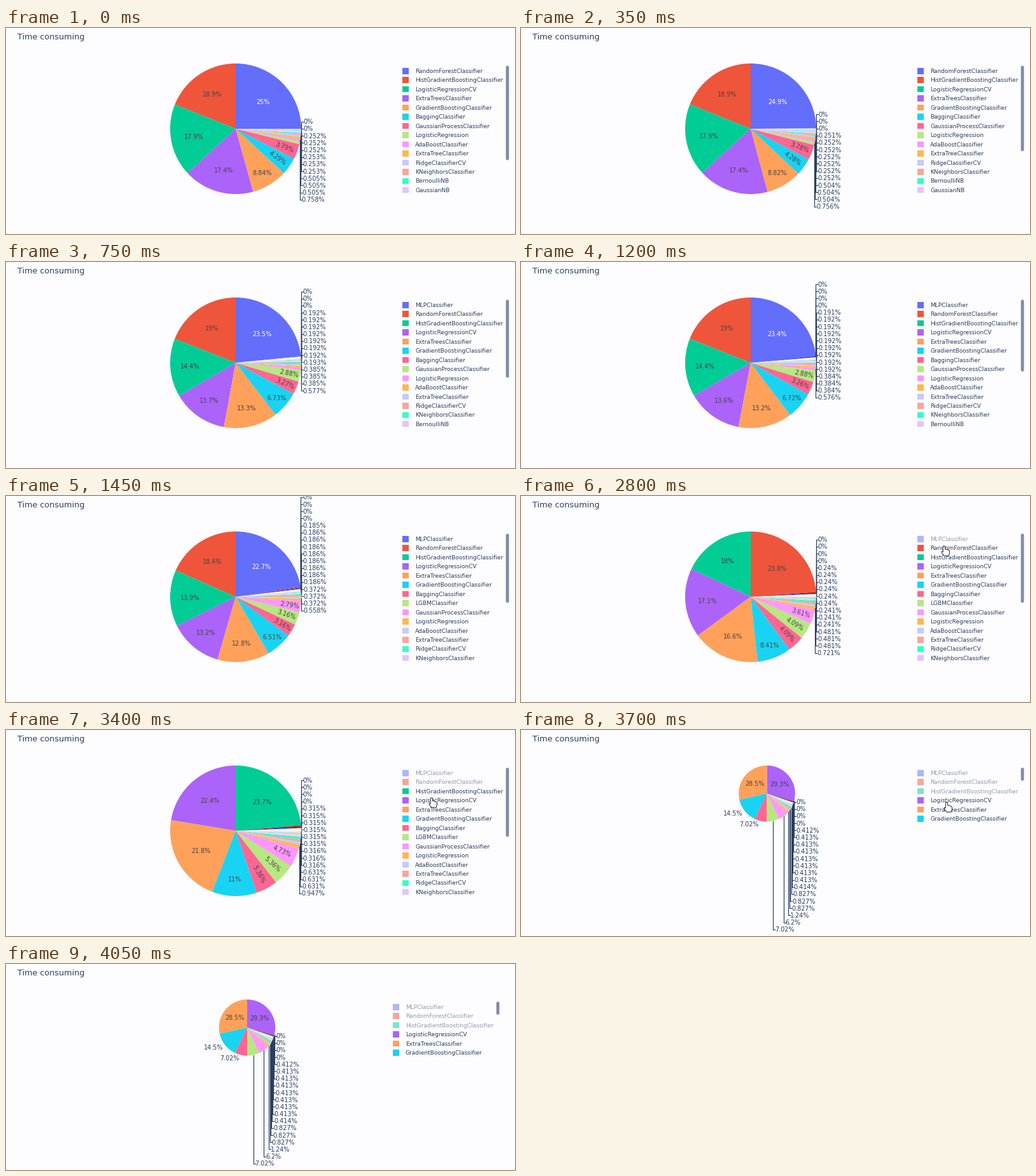
Write a matplotlib script that moves like this. It is 800x325 px and loops after 4.35 s.

```python
import colorsys
import math

import matplotlib.pyplot as plt
import numpy as np
from matplotlib.animation import FuncAnimation
from matplotlib.colors import to_rgb
from matplotlib.patches import FancyBboxPatch, Polygon, Rectangle, Wedge

W, H, DPI = 800, 325, 100
STEP, LOOP = 50, 4350
INK, DARK, PAPER = "#2a3f5f", "#444444", "#fdfcff"
LABEL_PX, LEGEND_PX, TITLE_PX = 9.7, 9.03, 12.8
PITCH, ROW = 11.18, 14.46

# name, seconds, stage at which the model finishes; sorted by time
MODELS = [
    ("MLPClassifier", 1.22, 4),
    ("RandomForestClassifier", 0.99, 0),
    ("HistGradientBoostingClassifier", 0.75, 0),
    ("LogisticRegressionCV", 0.71, 0),
    ("ExtraTreesClassifier", 0.69, 0),
    ("GradientBoostingClassifier", 0.35, 0),
    ("BaggingClassifier", 0.17, 0),
    ("LGBMClassifier", 0.17, 7),
    ("GaussianProcessClassifier", 0.15, 0),
    ("LogisticRegression", 0.03001, 0),
    ("AdaBoostClassifier", 0.02001, 0),
    ("ExtraTreeClassifier", 0.02001, 0),
    ("RidgeClassifierCV", 0.02001, 0),
    ("KNeighborsClassifier", 0.01001, 0),
    ("BernoulliNB", 0.010006, 0),
    ("GaussianNB", 0.010005, 0),
    ("LinearSVC", 0.00999, 0),
    ("NearestCentroid", 0.00999, 2),
    ("Perceptron", 0.00999, 3),
    ("SGDClassifier", 0.00999, 6),
    ("DecisionTreeClassifier", 0.00999, 0),
    ("CalibratedClassifierCV", 0.009975, 0),
    ("DummyClassifier", 0, 0),
    ("LinearDiscriminantAnalysis", 0, 0),
    ("PassiveAggressiveClassifier", 0, 1),
    ("RidgeClassifier", 0, 5),
]

# start in ms, stage, number of leading models hidden, layout
WIDE = dict(cx=361, cy=159, r=103, dx=0, rows=14)
SMALL = dict(cx=386.5, cy=100.3, r=44.3, dx=0, rows=6)
SMALL_SHIFTED = dict(SMALL, cx=379, dx=-15)
SCENES = [
    (0, 0, 0, WIDE), (150, 1, 0, WIDE), (350, 2, 0, WIDE), (600, 3, 0, WIDE),
    (750, 4, 0, WIDE), (1000, 5, 0, WIDE), (1200, 6, 0, WIDE),
    (1450, 7, 0, WIDE), (2700, 7, 1, WIDE), (3250, 7, 2, WIDE),
    (3650, 7, 3, SMALL), (4050, 7, 3, SMALL_SHIFTED),
]

# time, x, y of the pointer tip
POINTER = np.array([
    (2150, 608, 1), (2250, 627, 29), (2350, 651, 56), (2450, 660, 63),
    (2500, 661, 64), (2550, 661, 64), (2600, 662, 69), (2650, 662, 69),
    (2700, 664, 75), (2800, 665, 79), (2850, 665, 79), (3000, 667, 84),
    (3150, 668, 92), (3200, 668, 92), (3250, 668, 96), (3400, 669, 107),
    (3550, 669, 111), (3750, 669, 115), (3800, 669, 115), (3850, 618, 97),
])
POINTER_END = 3900
HAND = np.array([(-1.7, 1), (-0.8, 0), (0.6, 0), (1.6, 1), (1.6, 5), (4, 5),
                 (7.5, 6.5), (8.5, 8), (8.3, 11.5), (7, 15.5), (0, 15.5),
                 (-4, 10), (-3.7, 8.2), (-1.7, 9.3)])
ARROW = np.array([(0, 0), (0, 13), (3, 10.3), (5.3, 15.3), (7.2, 14.5),
                  (5, 9.7), (9.3, 9.5)])


def shade(color, delta):
    h, l, s = colorsys.rgb_to_hls(*to_rgb(color))
    return colorsys.hls_to_rgb(h, min(max(l + delta, 0), 1), s)


BASE = ["#636efa", "#ef553b", "#00cc96", "#ab63fa", "#ffa15a",
        "#19d3f3", "#ff6692", "#b6e880", "#ff97ff", "#ffb84f"]
COLORS = BASE + [shade(c, 0.2) for c in BASE] + [shade(c, -0.2) for c in BASE]

plt.rcParams["font.family"] = "DejaVu Sans"
fig = plt.figure(figsize=(W / DPI, H / DPI), dpi=DPI, facecolor=PAPER)
ax = fig.add_axes([0, 0, 1, 1])
ax.set(xlim=(0, W), ylim=(H, 0))
ax.axis("off")


def put_text(x, y, s, px, color=INK, ha="left", turn=0, alpha=1):
    """Text centred vertically on y; turn is clockwise in radians."""
    drop = 0.36 * px
    return ax.text(x - drop * math.sin(turn), y + drop * math.cos(turn), s,
                   fontsize=px * 72 / DPI, color=color, ha=ha, va="baseline",
                   rotation=-math.degrees(turn), rotation_mode="anchor",
                   alpha=alpha)


def percent(fraction):
    return f"{fraction * 100:.3g}%"


def text_width(s):
    return LABEL_PX * sum({".": 0.318, "%": 0.95}.get(c, 0.636) for c in s)


def inside_spot(fraction, s, r):
    """Radius share and whether to turn the label, or None if it must go out."""
    w, h = text_width(s), PITCH
    half = math.pi * min(fraction, 0.5)
    if half < 1e-6:
        return None
    inscribed = min(1 / (1 + 1 / math.sin(half)), 0.5)
    if 2 * inscribed * r >= math.hypot(w, h):
        return 1 - inscribed, False
    ratio = w / h
    q = ratio + 1 / (2 * math.tan(half))
    size = 1 / (math.sqrt(q * q + 0.5) + q)
    if 2 * size * (r - 6) >= h:
        return math.cos(size) - ratio * size, True
    return None


def stack(outside, natural):
    """Spread label heights away from three o'clock."""
    heights = {}
    upper = [k for k in outside if outside[k] <= 0.2501]
    lower = [k for k in outside if outside[k] > 0.2501]
    last = math.inf
    for k in reversed(upper):
        last = heights[k] = min(natural[k], last - PITCH)
    last = heights[upper[-1]] if upper else -math.inf
    for k in lower:
        last = heights[k] = max(natural[k], last + PITCH)
    return heights


def draw_pie(values, colors, cx, cy, r):
    parts = []
    shares = np.array(values) / sum(values)
    ends = 1 - np.concatenate([[0], np.cumsum(shares[1:])])
    outside, natural, edge = {}, {}, {}
    for i, share in enumerate(shares):
        start = 0 if i == 0 else ends[i - 1] - share
        mid = start + share / 2
        theta = 2 * math.pi * mid - math.pi / 2
        ux, uy = math.cos(theta), math.sin(theta)
        if share:
            parts.append(ax.add_patch(Wedge(
                (cx, cy), r, 360 * start - 90, 360 * (start + share) - 90,
                fc=colors[i], lw=0)))
        s = percent(share)
        spot = inside_spot(share, s, r)
        if spot:
            rho, turned = spot
            turn = theta + (math.pi if ux < 0 else 0) if turned else 0
            color = "white" if colors[i] == BASE[0] else DARK
            parts.append(put_text(cx + rho * r * ux, cy + rho * r * uy, s,
                                  LABEL_PX, color, "center", turn))
            continue
        x, y = cx + r * ux, cy + r * uy
        label_y = y + 5 * uy
        if ux < 0:
            parts.append(put_text(x - 3, label_y, s, LABEL_PX, ha="right"))
        else:
            outside[i], natural[i], edge[i] = mid, label_y, (x, y)
    clockwise = {i: outside[i] for i in reversed(outside)}
    for i, label_y in stack(clockwise, natural).items():
        x, y = edge[i]
        parts += ax.plot([x, x, x + 3], [y, label_y, label_y], color=INK,
                         lw=0.85, solid_joinstyle="miter")
        parts.append(put_text(x + 3, label_y, percent(shares[i]), LABEL_PX))
    return parts


def draw_legend(names, hidden, dx, rows):
    parts = []
    for i, name in enumerate(names[:rows]):
        y = 67.7 + ROW * i
        alpha = 0.5 if i < hidden else 1
        parts.append(ax.add_patch(Rectangle((623 + dx, y - 4.7), 9.5, 9.5,
                                            fc=COLORS[i], lw=0, alpha=alpha)))
        parts.append(put_text(643 + dx, y, name, LEGEND_PX, alpha=alpha))
    length = 2831 / len(names) if rows == 14 else 20.5
    parts.append(ax.add_patch(FancyBboxPatch(
        (785.7 + dx, 59.5), 4.8, length, fc="#808ba4", lw=0,
        boxstyle="round,pad=0,rounding_size=2.3")))
    return parts


def build_scene(stage, hidden, layout):
    models = [m for m in MODELS if m[2] <= stage]
    values = [m[1] for m in models[hidden:]]
    colors = COLORS[hidden:len(models)]
    return (draw_pie(values, colors, layout["cx"], layout["cy"], layout["r"])
            + draw_legend([m[0] for m in models], hidden,
                          layout["dx"], layout["rows"]))


put_text(17.5, 13.8, "Time consuming", TITLE_PX)
scenes = [build_scene(*scene[1:]) for scene in SCENES]
starts = [scene[0] for scene in SCENES]
pointer = ax.add_patch(Polygon(ARROW, fc="white", ec="#222222", lw=0.7,
                               zorder=5))


def update(frame):
    t = frame * STEP
    current = np.searchsorted(starts, t, side="right") - 1
    for i, parts in enumerate(scenes):
        for part in parts:
            part.set_visible(i == current)
    pointer.set_visible(POINTER[0, 0] <= t < POINTER_END)
    tip = [np.interp(t, POINTER[:, 0], POINTER[:, k]) for k in (1, 2)]
    shape = HAND if tip[0] > 620 and tip[1] > 58 else ARROW
    pointer.set_xy(shape + tip)
    return []


update(0)
anim = FuncAnimation(fig, update, frames=LOOP // STEP, interval=STEP,
                     repeat=True, repeat_delay=0, blit=False)
plt.show()
```
